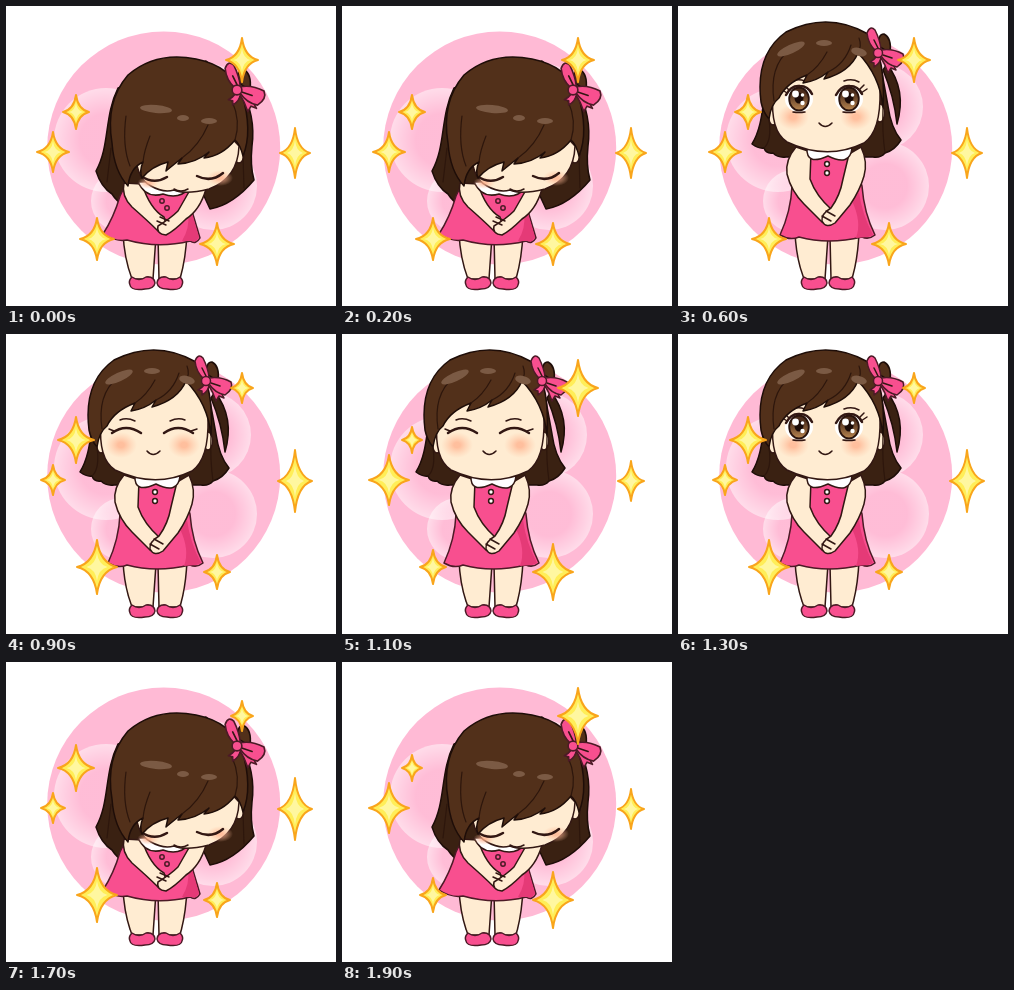
An HTML page for the animation above (2000 ms loop, 330 by 300 pixels).

```html
<!DOCTYPE html>
<html lang="en">
<head>
<meta charset="utf-8">
<title>Bowing girl</title>
<style>
  html, body { margin: 0; width: 100%; height: 100%; overflow: hidden; background: #fff; }
  svg { display: block; width: 330px; height: 300px; }
  .skin, .hair, .back, .pink, .white, .line { stroke: #321713; stroke-width: 1.5; stroke-linejoin: round; stroke-linecap: round; }
  .skin { fill: #ffecd2; }
  .hair { fill: #52301a; stroke: #1e0d08; }
  .back { fill: #3a2112; stroke: #1e0d08; }
  .pink { fill: #f84f8f; stroke: #4c1a26; }
  .white { fill: #fff; }
  .line { fill: none; }
  .thick { stroke-width: 2.5; }
  .strand { fill: none; stroke: #2d160c; stroke-width: 1.2; stroke-linecap: round; }
  .shine { fill: #7b5a44; }
  .shade { fill: #e53a77; }
  .star { fill: #ffee58; stroke: #f9a51b; stroke-width: 2; stroke-linejoin: round; }
  .core { fill: #fff7a0; }
  .pose, .eyes { display: none; }
  .on { display: inline; }
</style>
</head>
<body>
<svg viewBox="0 0 330 300">
  <defs>
    <radialGradient id="bubble">
      <stop offset=".5" stop-color="#fff" stop-opacity=".04"/>
      <stop offset="1" stop-color="#fff" stop-opacity=".5"/>
    </radialGradient>
    <radialGradient id="blush">
      <stop offset=".2" stop-color="#ffb08c" stop-opacity=".75"/>
      <stop offset="1" stop-color="#ffc3a0" stop-opacity="0"/>
    </radialGradient>
    <linearGradient id="iris" x2="0" y2="1">
      <stop offset=".2" stop-color="#4a2b1b"/>
      <stop offset="1" stop-color="#b98650"/>
    </linearGradient>
    <g id="bow">
      <path class="hair" d="M2 -6Q-1 -19 6 -19Q14 -15 12 0Z"/>
      <path class="pink" d="M-1 3Q-4 7 -8 9L-4 10L-4 14Q3 10 3 3ZM2 3Q7 11 10 20L13 15L18 17Q13 6 6 2Z"/>
      <path class="pink" d="M-2 -2Q-10 -9 -11 -20Q-8 -28 -3 -23Q2 -13 3 -4ZM3 -3Q14 -5 25 1Q28 8 19 14Q9 12 3 3Z"/>
      <path class="line" d="M0 -5L-4 -13M5 2L14 5"/>
      <ellipse class="pink" rx="4.5" ry="4.5"/>
    </g>
    <g id="eye">
      <ellipse rx="14" ry="13" fill="#fff"/>
      <ellipse rx="9.8" ry="11.5" fill="url(#iris)" stroke="#29130d" stroke-width="1.8"/>
      <ellipse cy="-1" rx="4.5" ry="5.5" fill="#1b0b08"/>
      <circle cx="-3.5" cy="-5" r="3.4" fill="#fff"/>
      <circle cx="3.5" cy="-4" r="1.8" fill="#fff"/>
      <circle cx="3.5" cy="4" r="2.2" fill="#fff"/>
      <path class="line thick" d="M-13 -4Q-8 -14 1 -13Q9 -13 13 -5"/>
      <path class="line" d="M-6 13Q0 14 6 13"/>
    </g>
  </defs>

  <circle cx="157.7" cy="142" r="116.5" fill="#ffbad5"/>
  <g fill="url(#bubble)">
    <circle cx="100" cy="134" r="52"/>
    <circle cx="202" cy="101" r="43"/>
    <circle cx="116" cy="195" r="31"/>
    <circle cx="207" cy="180" r="44"/>
  </g>

  <g id="legs">
    <path class="skin" d="M117 226Q118 252 126 273H147L150 230ZM152 230L153 273H174Q180 252 181 226Z"/>
    <path class="pink" d="M126 271Q133 276 140 271Q148 270 149 277Q148 283 139 283Q125 285 124 279Q122 275 126 271ZM174 271Q167 276 160 271Q152 270 151 277Q152 283 161 283Q175 285 176 279Q178 275 174 271Z"/>
  </g>

  <g class="pose" id="deep">
    <path class="back" d="M112 82C98 110 104 140 90 165Q95 181 106 188Q111 196 118 199L122 180L198 190L204 203Q227 199 248 174Q244 160 246 140Q250 110 235 82L200 55Z"/>
    <path class="pink" d="M114 190Q108 211 97 228Q109 236 121 234Q152 243 184 235Q190 239 194 232L186 205L181 178H120Z"/>
    <path class="shade" d="M182 208Q184 222 176 235L190 235L193 231L186 207Z"/>
    <path class="skin" d="M118 177Q115 190 126 201Q142 215 152 225Q162 221 158 211Q144 203 136 178Z"/>
    <path class="skin" d="M200 183Q194 204 180 213Q168 225 160 229Q150 228 152 220Q165 212 172 205L184 184Z"/>
    <path class="line" d="M151 215L160 219M154 211L163 215"/>
    <path class="white" d="M132 176Q140 193 157 188Q173 194 184 182L180 175Z"/>
    <g class="pink"><circle cx="156" cy="195" r="2.2"/><circle cx="161" cy="202" r="2.2"/></g>
    <ellipse class="skin" cx="233" cy="148" rx="5" ry="9"/>
    <path class="skin" d="M130 140Q128 171 145 180Q157 187 168 184Q179 189 203 183Q232 172 233 140L200 105Z"/>
    <g fill="url(#blush)"><ellipse cx="142" cy="177" rx="11" ry="6"/><ellipse cx="214" cy="172" rx="13" ry="8"/></g>
    <path class="line thick" d="M135 170Q148 179 161 171M191 170Q205 177 217 167"/>
    <path class="line" d="M168 183Q175 187 182 183"/>
    <path class="hair" d="M106 137Q99 96 122 69Q150 45 190 53Q225 60 236 88Q247 125 237 150Q234 138 229 134Q216 150 198 152L203 146Q190 157 172 158L176 152Q166 160 160 165L162 156Q146 160 136 172Q133 165 137 156Q124 162 122 180Q108 165 106 137Z"/>
    <path class="strand" d="M120 110Q116 140 124 160M144 130Q138 145 137 156M176 152Q193 140 202 119M229 134Q235 115 226 95M237 150L238 182M105 142L101 176"/>
    <g class="shine"><ellipse cx="150" cy="103" rx="16" ry="4" transform="rotate(5 150 103)"/><ellipse cx="177" cy="112" rx="6" ry="3"/><ellipse cx="203" cy="115" rx="8" ry="3"/></g>
    <use href="#bow" transform="translate(231 84) scale(1.08)"/>
  </g>

  <g class="pose" id="middle">
    <path class="back" d="M104 70C92 95 98 130 89 162Q97 166 101 172Q110 178 120 179H200Q222 178 238 163Q232 150 235 135Q245 110 232 75L200 45Z"/>
    <path class="pink" d="M116 202Q108 216 98 230Q109 237 121 234Q152 241 185 234Q190 237 195 232Q190 214 184 202L181 168H136Z"/>
    <path class="shade" d="M180 206Q184 222 177 235L190 234L194 231L184 204Z"/>
    <path class="skin" d="M124 169Q110 185 121 197Q140 214 152 224Q161 222 159 212Q144 204 139 190L138 170Z"/>
    <path class="skin" d="M194 165Q191 190 180 206L165 223Q156 229 151 222Q150 215 161 209Q173 195 176 170Z"/>
    <path class="line" d="M150 215L159 219M154 211L163 215"/>
    <path class="white" d="M136 164Q139 181 159 174Q178 182 184 164Z"/>
    <g class="white"><circle cx="159" cy="179" r="2.2"/><circle cx="160" cy="187" r="2.2"/></g>
    <ellipse class="skin" cx="106" cy="132" rx="4.5" ry="10"/>
    <ellipse class="skin" cx="224" cy="133" rx="4" ry="9"/>
    <path class="skin" d="M106 123Q106 154 126 164Q165 182 205 162Q225 150 224 118Q200 80 150 85Q110 95 106 123Z"/>
    <g fill="url(#blush)"><ellipse cx="134" cy="157" rx="15" ry="9"/><ellipse cx="198" cy="155" rx="14" ry="9"/></g>
    <path class="line thick" d="M127 145Q141 153 156 147M179 147Q191 152 204 144"/>
    <path class="line" d="M127 145L123 144M129 148L125 149M204 144L208 143M161 160Q167 166 174 160"/>
    <path class="hair" d="M100 137Q90 91 111 62Q140 35 180 40Q215 48 224 75Q232 110 225 139Q222 122 208 106Q193 125 170 129L176 123Q163 131 148 131L154 125Q130 130 115 147Q116 138 121 130Q109 137 107 119Q104 123 100 137Z"/>
    <path class="strand" d="M119 78Q106 96 107 123M144 107Q129 118 121 130M154 125Q179 117 200 91M208 106Q213 97 211 85M100 137L98 164M225 139L225 168M110 145L111 171"/>
    <g class="shine"><ellipse cx="145" cy="87" rx="14" ry="3.6" transform="rotate(8 145 87)"/><ellipse cx="169" cy="95" rx="5" ry="2.6"/><ellipse cx="194" cy="97" rx="7" ry="2.6"/></g>
    <use href="#bow" transform="translate(218 72)"/>
  </g>

  <g class="pose" id="upright">
    <path class="back" d="M94 60C83 85 88 115 74 138Q81 143 86 142Q88 148 95 147Q100 152 108 151H195Q203 152 207 147Q217 144 223 134Q213 122 210 100L200 45Z"/>
    <path class="back" d="M209 58Q229 84 219 118Q216 90 205 64Z"/>
    <path class="pink" d="M114 180Q113 205 102 229Q112 235 121 231Q150 239 184 231Q191 234 197 229Q186 207 184 180L173 145H130Z"/>
    <path class="shade" d="M174 195Q184 216 178 232L190 231L195 229Q184 208 181 186Z"/>
    <path class="skin" d="M118 141Q107 154 109 168Q113 185 126 198L144 216Q152 221 156 213L154 204Q138 190 132 173L133 146Z"/>
    <path class="skin" d="M183 141Q190 156 186 170Q182 184 172 199L157 217Q148 223 144 215Q143 208 153 202Q162 190 165 173L171 148Z"/>
    <path class="line" d="M144 210L153 215M148 205L157 210"/>
    <path class="white" d="M129 142Q128 160 150 150Q172 161 174 142Z"/>
    <g class="white"><circle cx="149" cy="158" r="2.4"/><circle cx="149" cy="167" r="2.4"/></g>
    <ellipse class="skin" cx="95" cy="110" rx="4.5" ry="9"/>
    <ellipse class="skin" cx="202" cy="107" rx="4.5" ry="9"/>
    <path class="skin" d="M95 88Q92 125 109 136Q149 155 186 137Q203 125 202 85Q200 45 180 40Q100 55 95 88Z"/>
    <g fill="url(#blush)"><ellipse cx="115" cy="111" rx="16" ry="13"/><ellipse cx="178" cy="111" rx="16" ry="13"/></g>
    <path class="line" d="M141 117Q147 124 154 117"/>
    <g class="eyes" id="open">
      <use href="#eye" x="121" y="93"/><use href="#eye" x="171" y="93"/>
      <path class="line" d="M109 87L103 83M111 84L106 79M183 87L189 83M181 84L186 79M112 76Q119 72 127 75M166 75Q174 72 181 76"/>
    </g>
    <g class="eyes" id="shut">
      <path class="line thick" d="M106 99Q120 89 135 99M158 99Q172 89 187 99"/>
      <path class="line" d="M108 97L103 95M185 97L191 95M114 86Q121 83 129 87M164 87Q172 83 179 86"/>
    </g>
    <path class="hair" d="M83 96Q77 48 108 26Q150 5 190 28Q208 50 205 101Q202 70 180 47Q172 66 146 73L150 66Q139 75 125 77L129 69Q108 77 101 92Q93 98 91 113Q85 106 83 96Z"/>
    <path class="strand" d="M111 44Q91 61 96 95M129 69Q141 61 149 46M150 66Q167 58 173 39M180 47Q184 40 181 32M91 113Q94 135 86 142M205 101Q204 126 207 147"/>
    <g class="shine"><ellipse cx="113" cy="43" rx="15" ry="4.5" transform="rotate(-25 113 43)"/><ellipse cx="146" cy="37" rx="8" ry="3"/><ellipse cx="181" cy="46" rx="8" ry="4" transform="rotate(15 181 46)"/></g>
    <use href="#bow" transform="translate(200 47)"/>
  </g>

  <g id="stars"></g>
</svg>
<script>
  // x, y, then [width, height] radii when small, medium and large; phase selects the pulsing group.
  const stars = [
    { x: 236, y: 54, sizes: [[12, 16], [17, 23], [21, 29]], phase: 2 },
    { x: 47, y: 146, sizes: [[13, 16], [17, 21], [21, 26]], phase: 2 },
    { x: 211, y: 238, sizes: [[14, 18], [18, 22], [21, 29]], phase: 2 },
    { x: 70, y: 106, sizes: [[11, 14], [14, 18], [19, 24]], phase: 0 },
    { x: 289, y: 147, sizes: [[14, 21], [16, 26], [18, 32]], phase: 0 },
    { x: 91, y: 233, sizes: [[14, 18], [18, 22], [21, 28]], phase: 0 }
  ];
  const pulse = [1, 2, 1, 0];

  // Four tips joined by curves that bend towards the centre.
  function starPath(x, y, w, h) {
    const bend = .15;
    const tips = [[1, 0], [0, 1], [-1, 0], [0, -1]];
    let path = `M${x} ${y - h}`;
    let [fromX, fromY] = [0, -1];
    for (const [toX, toY] of tips) {
      path += `Q${x + (fromX + toX) * bend * w} ${y + (fromY + toY) * bend * h} ${x + toX * w} ${y + toY * h}`;
      [fromX, fromY] = [toX, toY];
    }
    return path + "Z";
  }

  const layer = document.getElementById("stars");
  const show = (id, visible) => document.getElementById(id).classList.toggle("on", visible);

  function draw(now) {
    const step = Math.floor(now / 100) % 20;
    const fromEnd = Math.min(step, 19 - step);   // the bow is symmetric in time
    show("deep", fromEnd < 3);
    show("middle", fromEnd >= 3 && fromEnd < 5);
    show("upright", fromEnd >= 5);
    show("open", fromEnd < 8);
    show("shut", fromEnd >= 8);
    layer.innerHTML = stars.map(({ x, y, sizes, phase }) => {
      const [w, h] = sizes[pulse[(step + phase) % 4]];
      return `<path class="star" d="${starPath(x, y, w - 1, h - 1)}"/>` +
        `<path class="core" d="${starPath(x, y, w * .5, h * .5)}"/>`;
    }).join("");
  }

  const start = performance.now();
  function tick() {
    draw(performance.now() - start);
    requestAnimationFrame(tick);
  }
  tick();
</script>
</body>
</html>
```
